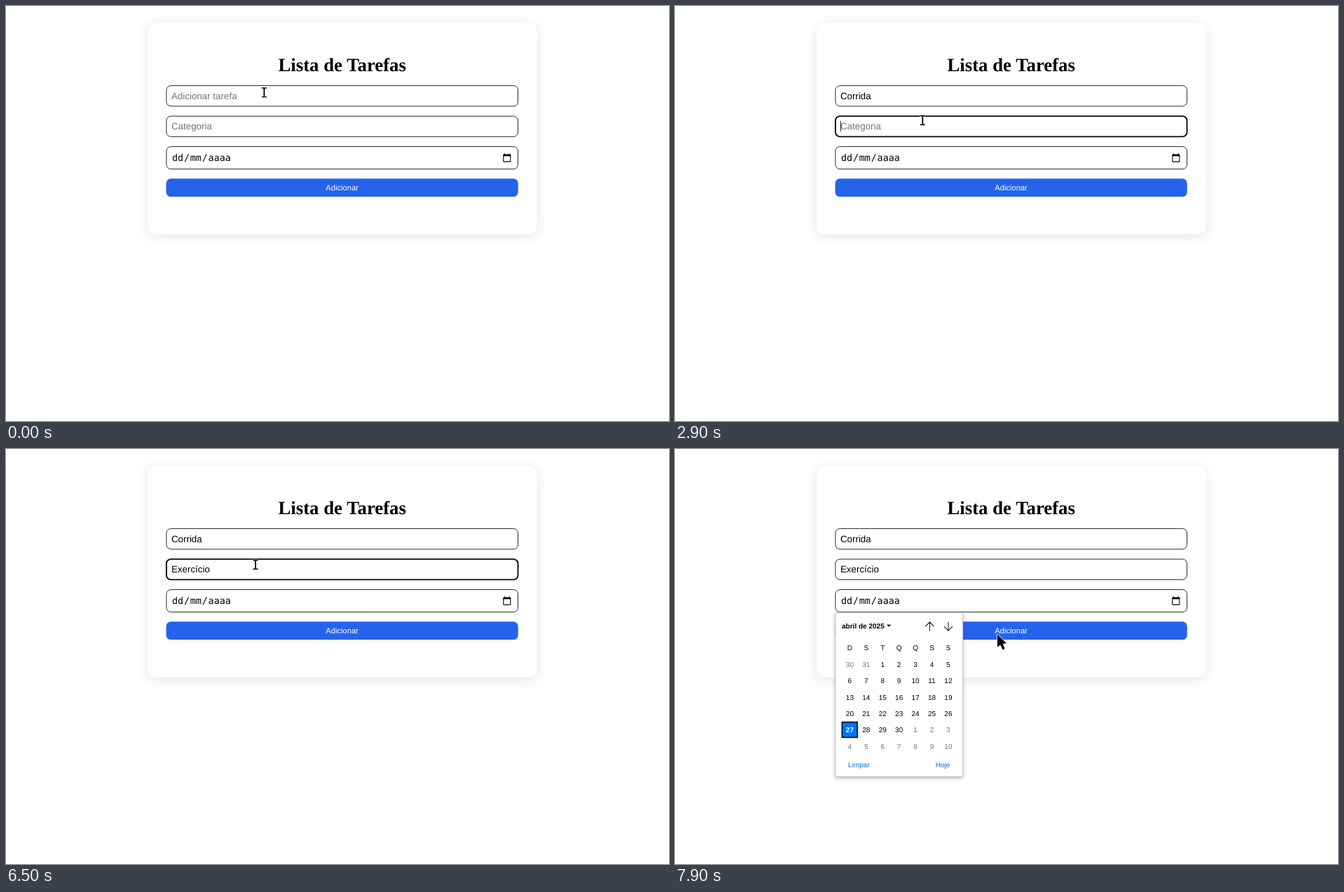
An HTML page for the animation above (8 s loop, 946 by 592 pixels).

```html
<!DOCTYPE html>
<html lang="pt-BR">
<head>
<meta charset="utf-8">
<title>Lista de Tarefas</title>
<style>
  html, body { margin: 0; width: 100%; height: 100%; overflow: hidden; background: #fff; }
  svg { display: block; width: 100%; height: 100%; }
  text { font: 13.39px "Liberation Sans", Arial, sans-serif; text-rendering: geometricPrecision; white-space: pre; }
  .title { font: bold 26.77px "Liberation Serif", "Times New Roman", serif; text-anchor: middle; }
  .date { font-family: "DejaVu Sans Mono", monospace; }
  .label { font-size: 11.16px; fill: #fff; text-anchor: middle; }
  .box { fill: #fff; stroke: #2b2b2b; stroke-width: 1; }
  .box.focus { stroke: #0a0a0a; stroke-width: 1.9; }
  .cal text { font-size: 10.04px; text-anchor: middle; }
  .cal .bold { font-weight: bold; }
  .cal .dim { fill: #757575; }
  .cal .link { fill: #0a72d0; }
  .pointer path { stroke: #fff; stroke-linejoin: round; }
</style>
</head>
<body>
<svg viewBox="0 0 946 592">
  <defs>
    <filter id="cardShadow" x="-10%" y="-15%" width="120%" height="135%">
      <feDropShadow dx="0" dy="3.3" stdDeviation="8.4" flood-opacity=".1"/>
    </filter>
    <filter id="popShadow" x="-10%" y="-10%" width="120%" height="120%">
      <feDropShadow dx="0" dy="2" stdDeviation="2.8" flood-opacity=".3"/>
    </filter>
  </defs>
  <rect width="946" height="592" fill="#fff"/>
  <rect x="202" y="24" width="555.5" height="301.6" rx="13.4" fill="#fff" filter="url(#cardShadow)"/>
  <text class="title" x="479.7" y="93">Lista de Tarefas</text>
  <g id="fields"></g>
  <rect class="box" x="228.9" y="200.6" width="501.6" height="32" rx="6.4"/>
  <text class="date" y="221.2"><tspan x="236.9">dd</tspan><tspan x="253.9">/</tspan><tspan x="262.8">mm</tspan><tspan x="279.7">/</tspan><tspan x="288.6">aaaa</tspan></text>
  <path transform="translate(708.1 209.8) scale(.558)" d="M20 3h-1V1h-2v2H7V1H5v2H4c-1.1 0-2 .9-2 2v16c0 1.1.9 2 2 2h16c1.1 0 2-.9 2-2V5c0-1.1-.9-2-2-2zm0 18H4V8h16v13z"/>
  <rect id="button" x="228.5" y="246.2" width="502.2" height="25.9" rx="6.7"/>
  <text class="label" x="479.6" y="263">Adicionar</text>
  <g id="calendar" class="cal">
    <rect x="228.9" y="233.3" width="181.8" height="234" rx="1" fill="#fff" stroke="#bfbfbf" stroke-width=".9" filter="url(#popShadow)"/>
    <text class="bold" x="238" y="255.5" style="text-anchor:start">abril de 2025</text>
    <path d="M302 250.4h6.2l-3.1 3.4z"/>
    <path d="M363.4 259.4v-12.6m-6 6.2 6-6.2 6 6.2M390 246.6v12.6m-6-6.2 6 6.2 6-6.2" fill="none" stroke="#222" stroke-width="1.1"/>
    <text class="link" x="262.4" y="454">Limpar</text>
    <text class="link" x="382" y="454">Hoje</text>
  </g>
  <g id="pointer" class="pointer">
    <path id="beam" d="M-3.4-7.2H-1L0-6.5 1-7.2H3.4V-5.6H.9V5.6H3.4V7.2H1L0 6.5-1 7.2H-3.4V5.6H-.9V-5.6H-3.4z" stroke-width="1" paint-order="stroke"/>
    <path id="arrow" d="M0 0V18.2L4.2 15 7.2 21.4Q8.6 22 10.5 20.3L7.8 13.5 13 12.6z" stroke-width="1.4" paint-order="stroke"/>
    <path id="hand" d="M-1.7.4C-1.1-1 .9-1 1.6.5L3.6 5 9.4 5.6C11.2 6 11.6 7.2 11.6 9V12.4L10 16.8H1.4L-3.2 13C-5.2 11.4-4.2 9.4-2.2 10.2L.8 11.2z" stroke-width="2.2" paint-order="stroke"/>
  </g>
</svg>
<script>
const LOOP = 8000, STEP = 100;
const $ = id => document.getElementById(id);

function add(parent, tag, attrs, text = '') {
  const node = document.createElementNS('http://www.w3.org/2000/svg', tag);
  for (const k in attrs) node.setAttribute(k, attrs[k]);
  node.textContent = text;
  parent.append(node);
  return node;
}

// Times below count steps of 100 ms.
const fields = [
  { y: 113.2, hint: 'Adicionar tarefa', word: 'Corrida', keys: [8, 11, 14, 15, 17, 18, 20], focus: 1, blur: 29 },
  { y: 156.7, hint: 'Categoria', word: 'Exercício', keys: [36, 40, 43, 45, 50, 54, 56, 57, 59], focus: 29, blur: 75, accent: [51, 54] }
];

for (const f of fields) {
  f.box = add($('fields'), 'rect', { x: 228.9, y: f.y + .4, width: 501.6, height: 29.3, rx: 6.4 });
  f.text = add($('fields'), 'text', { x: 235.9, y: f.y + 19.5 });
  f.main = add(f.text, 'tspan', {});
  f.mark = add(f.text, 'tspan', { 'text-decoration': 'underline' });
  f.caret = add($('fields'), 'rect', { y: f.y + 7.3, width: .9, height: 15 });
}

function buildCalendar() {
  const cal = $('calendar');
  const x = col => 249.4 + 23.42 * col;
  [...'DSTQQSS'].forEach((d, i) => add(cal, 'text', { x: x(i), y: 286.6 }, d));
  add(cal, 'rect', { x: 238.4, y: 389.6, width: 21.8, height: 21.8, fill: '#0075ff', stroke: '#101010', 'stroke-width': 1.7 });
  for (let i = 0; i < 42; i++) {
    const n = i - 1;
    const day = n < 1 ? n + 31 : n > 30 ? n - 30 : n;
    const cell = add(cal, 'text', { x: x(i % 7), y: 310.6 + 23.45 * Math.floor(i / 7) }, day);
    if (n < 1 || n > 30) cell.setAttribute('class', 'dim');
    if (n === 27) { cell.setAttribute('class', 'bold'); cell.setAttribute('fill', '#fff'); }
  }
}

// [step, x, y, shape]
const moves = [
  [0, 368.4, 123.3, 'beam'], [1, 368, 127.4, 'beam'],
  [25, 367.4, 128.3, 'beam'], [26, 365.5, 136, 'beam'], [27, 361, 147, 'arrow'], [28, 355, 160, 'beam'], [29, 353.3, 163, 'beam'],
  [65, 356, 165, 'beam'], [66, 385, 175, 'beam'], [67, 470, 205, 'arrow'], [68, 590, 247, 'hand'], [69, 659.2, 250.6, 'hand'],
  [70, 680, 249, 'hand'], [71, 699, 237, 'arrow'], [72, 711, 221, 'arrow'], [73, 715.2, 211.8, 'arrow'],
  [78, 600, 236, 'arrow'], [79, 460, 264.4, 'arrow']
];
const hover = { 68: '#2461e9', 69: '#2056de', 70: '#1d4ed8', 71: '#2159e2' };

function drawField(f, n) {
  const count = f.keys.filter(k => k <= n).length;
  const focused = n >= f.focus && n < f.blur;
  const accent = f.accent && n >= f.accent[0] && n < f.accent[1];
  const last = count ? f.keys[count - 1] : f.focus;
  const blinkOn = Math.floor((n - last) / 6) % 2 === 0;
  f.box.setAttribute('class', focused ? 'box focus' : 'box');
  f.main.textContent = count ? f.word.slice(0, count) : f.hint;
  f.mark.textContent = accent ? '´' : '';
  f.text.setAttribute('fill', count ? '#000' : '#757575');
  f.caret.setAttribute('x', 235.9 + (count ? f.text.getComputedTextLength() : 0));
  f.caret.style.display = focused && blinkOn ? '' : 'none';
}

function draw(time) {
  const n = Math.floor((time % LOOP) / STEP);
  fields.forEach(f => drawField(f, n));
  $('button').setAttribute('fill', hover[n] || '#2563eb');
  $('calendar').style.display = n >= 76 ? '' : 'none';
  const [, x, y, shape] = moves.filter(m => m[0] <= n).pop();
  $('pointer').setAttribute('transform', `translate(${x} ${y})`);
  for (const id of ['beam', 'arrow', 'hand']) $(id).style.display = id === shape ? '' : 'none';
}

buildCalendar();
const start = performance.now();
function tick() {
  draw(performance.now() - start);
  requestAnimationFrame(tick);
}
tick();
</script>
</body>
</html>
```
